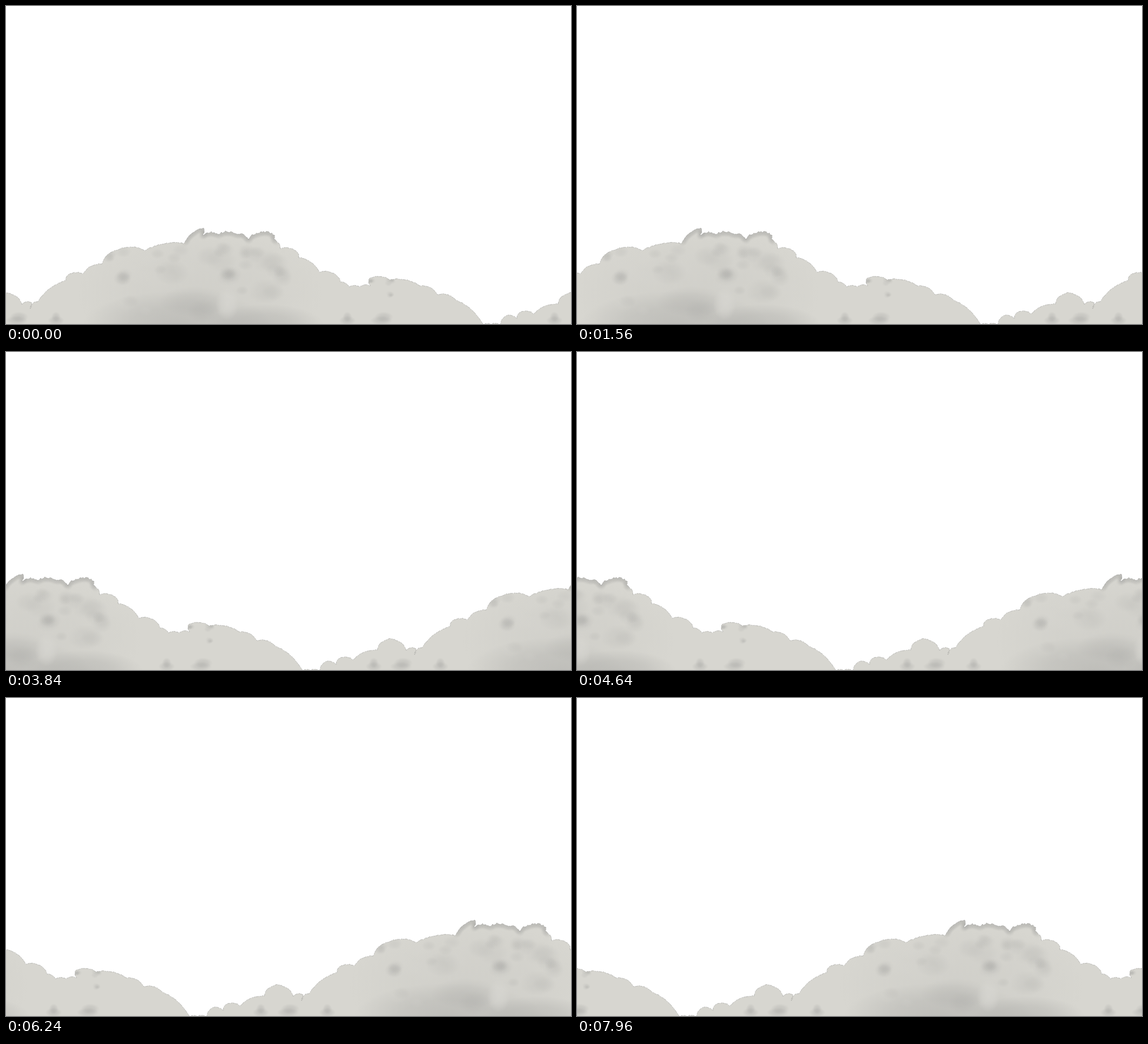
Animation, 960 px wide and 540 px high, one loop 8000 ms. Source, as an HTML page with a canvas:

```html
<!DOCTYPE html>
<html lang="en">
<head>
<meta charset="utf-8">
<title>Drifting clouds</title>
<style>
html, body { margin: 0; width: 100%; height: 100%; overflow: hidden; background: #fff; }
canvas { display: block; }
</style>
</head>
<body>
<canvas id="stage" width="960" height="540"></canvas>
<script>
const W = 960, H = 540, LOOP = 8000, STEP = 40, SPEED = 0.08;
const BASE = '#d7d6d0', LIGHT = '217,216,211', DARK = '150,150,148';
const ctx = document.getElementById('stage').getContext('2d');

// Valleys between puffs; the arcs and their fluff follow by rule.
const valleys = [
  [27, 507], [43, 503], [41, 514], [46, 505], [54, 502], [102, 466], [104, 458], [131, 455],
  [163, 438], [190, 414], [236, 415], [303, 403], [336, 377], [334, 389], [361, 388],
  [388, 386], [412, 397], [428, 386], [456, 389], [455, 396], [466, 412], [495, 418],
  [497, 427], [533, 452], [563, 459], [568, 469], [583, 477], [601, 477], [619, 475],
  [617, 463], [652, 465], [703, 475], [733, 490], [764, 499], [811, 541], [824, 541],
  [840, 541], [852, 525], [868, 531], [874, 520], [897, 523], [938, 506], [950, 490],
  [970, 490], [987, 507]
];

function seeded(seed) {
  return () => (seed = (seed * 16807) % 2147483647) / 2147483647;
}

function skyline() {
  const rnd = seeded(77), points = [valleys[0]];
  for (let i = 1; i < valleys.length; i++) {
    const [x0, y0] = valleys[i - 1], [x1, y1] = valleys[i];
    const dx = x1 - x0, dy = y1 - y0, len = Math.hypot(dx, dy);
    const bulge = Math.min(5.5, len * 0.15), fluff = y0 < 400 ? 3 : 1.3;
    const n = Math.ceil(len / 2.5);
    for (let k = 1; k <= n; k++) {
      const u = k / n, lift = 4 * u * (1 - u) * bulge;
      const rough = k < n ? (rnd() - 0.5) * fluff : 0;
      points.push([x0 + dx * u + dy / len * lift, y0 + dy * u - dx / len * lift + rough]);
    }
  }
  return points;
}

function blob(c, x, y, rx, ry, alpha, rgb = DARK) {
  c.save();
  c.translate(x, y);
  c.scale(rx, ry);
  const g = c.createRadialGradient(0, 0, 0, 0, 0, 1);
  g.addColorStop(0, `rgba(${rgb},${alpha})`);
  g.addColorStop(0.5, `rgba(${rgb},${alpha * 0.7})`);
  g.addColorStop(1, `rgba(${rgb},0)`);
  c.fillStyle = g;
  c.fillRect(-1, -1, 2, 2);
  c.restore();
}

// A loose cluster of blobs around one spot.
function smudge(c, rnd, x, y, size, alpha) {
  for (let i = 0; i < 5; i++) {
    const r = size * (0.6 + rnd() * 0.4);
    blob(c, x + (rnd() - 0.5) * size, y + (rnd() - 0.5) * size, r, r * 0.8, alpha);
  }
}

function shade(c, line) {
  const rnd = seeded(2024);
  // Broad shadow under the big cloud
  blob(c, 330, 490, 210, 110, 0.1);
  blob(c, 290, 540, 160, 56, 0.32);
  blob(c, 320, 502, 60, 26, 0.16);
  blob(c, 440, 542, 100, 36, 0.32);
  for (let i = 0; i < 40; i++) {
    const r = 8 + rnd() * 14;
    blob(c, 190 + rnd() * 310, 410 + rnd() * 110, r * 1.4, r, 0.08 + rnd() * 0.06, i % 2 ? LIGHT : DARK);
  }
  blob(c, 376, 506, 20, 28, 0.65, LIGHT);

  for (const x of [201, 381, 465]) smudge(c, rnd, x, 455, 18, 0.1);
  for (const x of [365, 405]) smudge(c, rnd, x, 416, 16, 0.05);

  // Grey rims on the ragged crests
  for (const [x, y] of line) {
    if (y < 401 && x > 303) blob(c, x, y + 1, 8, 8, 0.12);
  }
  smudge(c, rnd, 179, 425, 13, 0.1);
  for (const x of [619, 653, 701]) smudge(c, rnd, x, 468, 7, 0.15);
  smudge(c, rnd, 654, 491, 6, 0.12);

  // Tufts along the ground, narrow and wide in turn
  [85, 642, 580, 982, 932].forEach((x, i) => {
    const wide = i % 2;
    blob(c, x, 528, 8 + wide * 8, 9, 0.28);
    blob(c, x - wide * 4, 534, 14 + wide * 5, 8, 0.3);
  });
}

function paint(c, line) {
  const outline = new Path2D();
  for (const [x, y] of line) outline.lineTo(x, y);
  const body = new Path2D(outline);
  body.lineTo(987, H + 5);
  body.lineTo(27, H + 5);
  body.closePath();
  c.fillStyle = BASE;
  c.fill(body);
  c.save();
  c.clip(body);
  for (const wrap of [-W, 0]) {
    c.save();
    c.translate(wrap, 0);
    shade(c, line);
    c.restore();
  }
  c.restore();
  c.strokeStyle = 'rgba(125,125,122,0.5)';
  c.lineWidth = 0.8;
  c.setLineDash([3, 1, 5, 2, 2, 1]);
  c.stroke(outline);
}

// One seamless strip, as wide as the stage.
const tile = document.createElement('canvas');
tile.width = W;
tile.height = H;
const tc = tile.getContext('2d');
const line = skyline();
for (const wrap of [-W, 0]) {
  tc.setTransform(1, 0, 0, 1, wrap, 0);
  paint(tc, line);
}

function draw(now) {
  const t = Math.floor((now % LOOP) / STEP) * STEP;
  const x = -Math.round(t * SPEED);
  ctx.fillStyle = '#fff';
  ctx.fillRect(0, 0, W, H);
  ctx.drawImage(tile, x, 0);
  ctx.drawImage(tile, x + W, 0);
}

let start;
function frame(now) {
  start ??= now;
  draw(now - start);
  requestAnimationFrame(frame);
}
draw(0);
requestAnimationFrame(frame);
</script>
</body>
</html>
```
